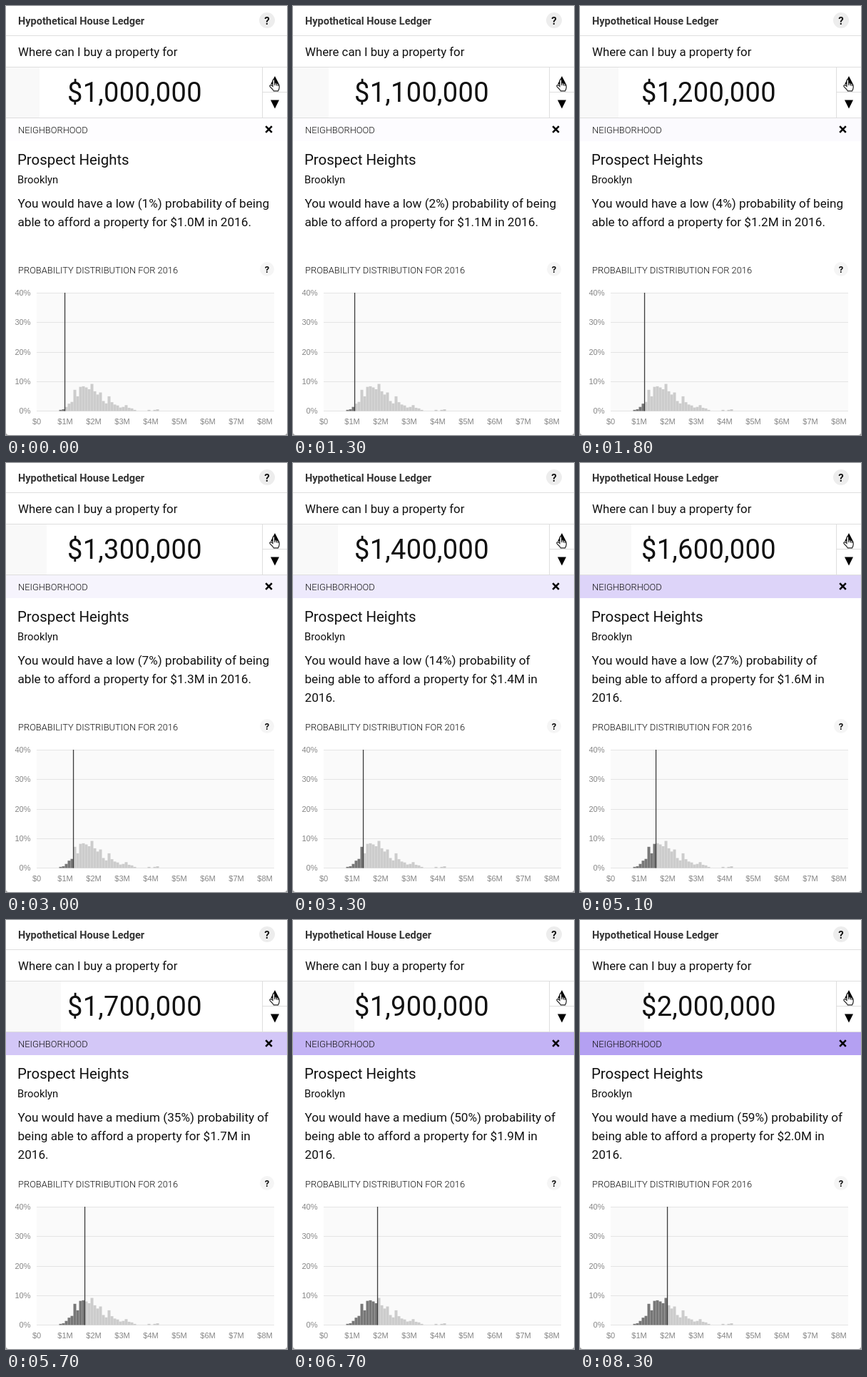
Animation of 394 by 600 pixels, one loop 8400 ms. Source, as an HTML page with a canvas:

```html
<!DOCTYPE html>
<html lang="en">
<head>
<meta charset="utf-8">
<title>Hypothetical House Ledger</title>
<style>
html, body { margin: 0; width: 394px; height: 600px; overflow: hidden; background: #fff; }
canvas, svg { position: absolute; left: 0; top: 0; width: 394px; height: 600px; }
text { font-family: Roboto, "Open Sans", sans-serif; fill: #111; white-space: pre; }
.axis { font-family: "Liberation Sans", Arial, sans-serif; font-size: 11px; fill: #858585; }
</style>
</head>
<body>
<canvas id="stage"></canvas>
<svg id="labels" viewBox="0 0 394 600"></svg>
<script>
const W = 394, H = 600, LOOP = 8400;
const canvas = document.getElementById('stage');
const labels = document.getElementById('labels');
const ctx = canvas.getContext('2d');
const ratio = window.devicePixelRatio || 1;
canvas.width = W * ratio;
canvas.height = H * ratio;

// One state per click: start time, chance in percent, width of the slider fill
const states = [
  [0, 1, 47], [1300, 2, 50], [1800, 4, 54], [2500, 7, 57],
  [3100, 14, 63], [3800, 19, 68], [4500, 27, 72], [5200, 35, 77],
  [5900, 43, 81], [6700, 50, 86], [7700, 59, 90]
].map(([start, chance, fill], i) => ({ start, chance, fill, price: 10 + i }));

// Share of each $0.1M bin, beginning at $0.8M
const bins = [0.4, 0.6, 1.4, 2.5, 3.1, 7.2, 5, 8.2, 8.4, 8, 7.4, 9.2, 6.7, 5.6, 6.3,
  3.4, 2.6, 5, 3, 2.2, 1.9, 1.2, 1.4, 2, 1.1, 0.9, 0.4, 0, 0, 0, 0, 0.4, 0, 0.4, 0.6];

const plot = { left: 43, right: 376, top: 401.5, base: 566.5 };
const levelY = share => plot.base - share * (plot.base - plot.top) / 40;
const priceX = price => 42.5 + price * 4;

function addText(str, x, y, size, weight = 400, anchor = 'start', cls = '') {
  const el = document.createElementNS('http://www.w3.org/2000/svg', 'text');
  el.setAttribute('x', x);
  el.setAttribute('y', y);
  el.setAttribute('text-anchor', anchor);
  if (cls) el.setAttribute('class', cls);
  else { el.style.fontSize = size + 'px'; el.style.fontWeight = weight; }
  el.textContent = str;
  labels.appendChild(el);
  return el;
}

addText('Hypothetical House Ledger', 17, 26, 14.5, 700).style.fill = '#333';
addText('?', 366, 25.5, 15, 700, 'middle');
addText('Where can I buy a property for', 17, 70, 16.8);
const priceText = addText('', 86, 134, 38);
priceText.style.letterSpacing = '0.3px';
addText('NEIGHBORHOOD', 17, 178, 12.9, 300);
addText('Prospect Heights', 16, 222, 20.4);
addText('Brooklyn', 16, 248, 14.8);
const bodyText = [282, 308, 334].map(y => addText('', 16.5, y, 17.15));
addText('PROBABILITY DISTRIBUTION FOR 2016', 17, 374, 12.9, 300);
addText('?', 366, 372.5, 13, 700, 'middle');
for (let p = 0; p <= 40; p += 10) addText(p + '%', 34.5, levelY(p) + 3.5, 0, 0, 'end', 'axis');
for (let m = 0; m <= 8; m++) addText(m ? `$${m}M` : '$0', 43 + m * 40, 585, 0, 0, 'middle', 'axis');

function rect(x, y, w, h, color) {
  ctx.fillStyle = color;
  ctx.fillRect(x, y, w, h);
}

function disc(x, y, r, color) {
  ctx.fillStyle = color;
  ctx.beginPath();
  ctx.arc(x, y, r, 0, 7);
  ctx.fill();
}

function triangle(x, tip, base) {
  ctx.fillStyle = '#000';
  ctx.beginPath();
  ctx.moveTo(x, tip);
  ctx.lineTo(x + 6, base);
  ctx.lineTo(x - 6, base);
  ctx.fill();
}

const hand = new Path2D('M374 112V104.3Q374 102.8 375.3 102.8Q376.6 102.8 376.6 104.3V108' +
  'Q378.8 107 379.2 108.6Q381.2 107.9 381.5 109.6Q383.2 109.4 383.2 111.2V114' +
  'Q383 116.5 381.6 118.8H375.3Q373.6 116 371.2 114Q369 111.9 370.2 110.9Q371.6 110 374 112.4Z');
const knuckles = new Path2D('M376.8 108V111M379.3 109V111.4M381.5 110V112');

function drawHand() {
  ctx.fillStyle = '#fff';
  ctx.strokeStyle = '#222';
  ctx.lineWidth = 1.2;
  ctx.fill(hand);
  ctx.stroke(hand);
  ctx.stroke(knuckles);
}

function drawCross(x, y, r) {
  ctx.strokeStyle = '#000';
  ctx.lineWidth = 2.6;
  ctx.beginPath();
  ctx.moveTo(x - r, y - r);
  ctx.lineTo(x + r, y + r);
  ctx.moveTo(x + r, y - r);
  ctx.lineTo(x - r, y + r);
  ctx.stroke();
}

function bandColor(chance) {
  const c = [1.27, 1.61, 0.22].map(k => Math.round(255 - k * chance));
  return `rgb(${c})`;
}

function drawChart(price) {
  rect(plot.left, plot.top, plot.right - plot.left, plot.base - plot.top, '#fafafa');
  for (let p = 0; p <= 40; p += 10) {
    rect(plot.left, Math.round(levelY(p) - 0.5), plot.right - plot.left, 1, '#e4e4e4');
  }
  bins.forEach((share, i) => {
    const bin = i + 8;
    const y = levelY(share);
    rect(priceX(bin), y, 4, plot.base - y, bin < price ? '#777' : '#ccc');
  });
  rect(priceX(price) - 0.6, 401, 1.3, 165.5, '#3c3c3c');
}

function drawCorners() {
  ctx.fillStyle = '#999';
  ctx.beginPath();
  ctx.rect(0, 0, W, H);
  ctx.roundRect(0, -8, W, H + 8, 4);
  ctx.fill('evenodd');
}

function setText(el, str) {
  if (el.textContent !== str) el.textContent = str;
}

function bodyLines({ chance, price }) {
  const level = chance < 33 ? 'low' : 'medium';
  const start = `You would have a ${level} (${chance}%) probability of`;
  const end = `able to afford a property for $${(price / 10).toFixed(1)}M in`;
  return chance < 10
    ? [start + ' being', end + ' 2016.', '']
    : [start, 'being ' + end, '2016.'];
}

function draw(t) {
  let n = states.length - 1;
  while (states[n].start > t) n--;
  const now = states[n], before = states[Math.max(0, n - 1)];
  const k = Math.min(1, (t - now.start + 100) / 400);
  const shade = before.chance + (now.chance - before.chance) * (1 - (1 - k) ** 3);

  ctx.setTransform(ratio, 0, 0, ratio, 0, 0);
  rect(0, 0, W, H, '#fff');
  rect(0, 86, now.fill, 70, '#f9f9f9');
  rect(0, 157, W, 32, bandColor(shade));
  for (const y of [41, 85, 156]) rect(0, y, W, 1, '#dedede');
  rect(359, 86, 1, 70, '#dedede');
  rect(360, 120, 34, 1, '#dedede');
  disc(366, 20, 11, '#ededed');
  disc(366, 368, 10, '#f5f5f5');
  triangle(377, 98, 109.5);
  triangle(377, 143.5, 131.5);
  drawHand();
  drawCross(368.5, 172.5, 4.3);
  drawChart(now.price);
  drawCorners();

  setText(priceText, '$' + (now.price * 100000).toLocaleString('en-US'));
  bodyLines(now).forEach((line, i) => setText(bodyText[i], line));
}

function frame() {
  draw(performance.now() % LOOP);
  requestAnimationFrame(frame);
}
frame();
</script>
</body>
</html>
```
